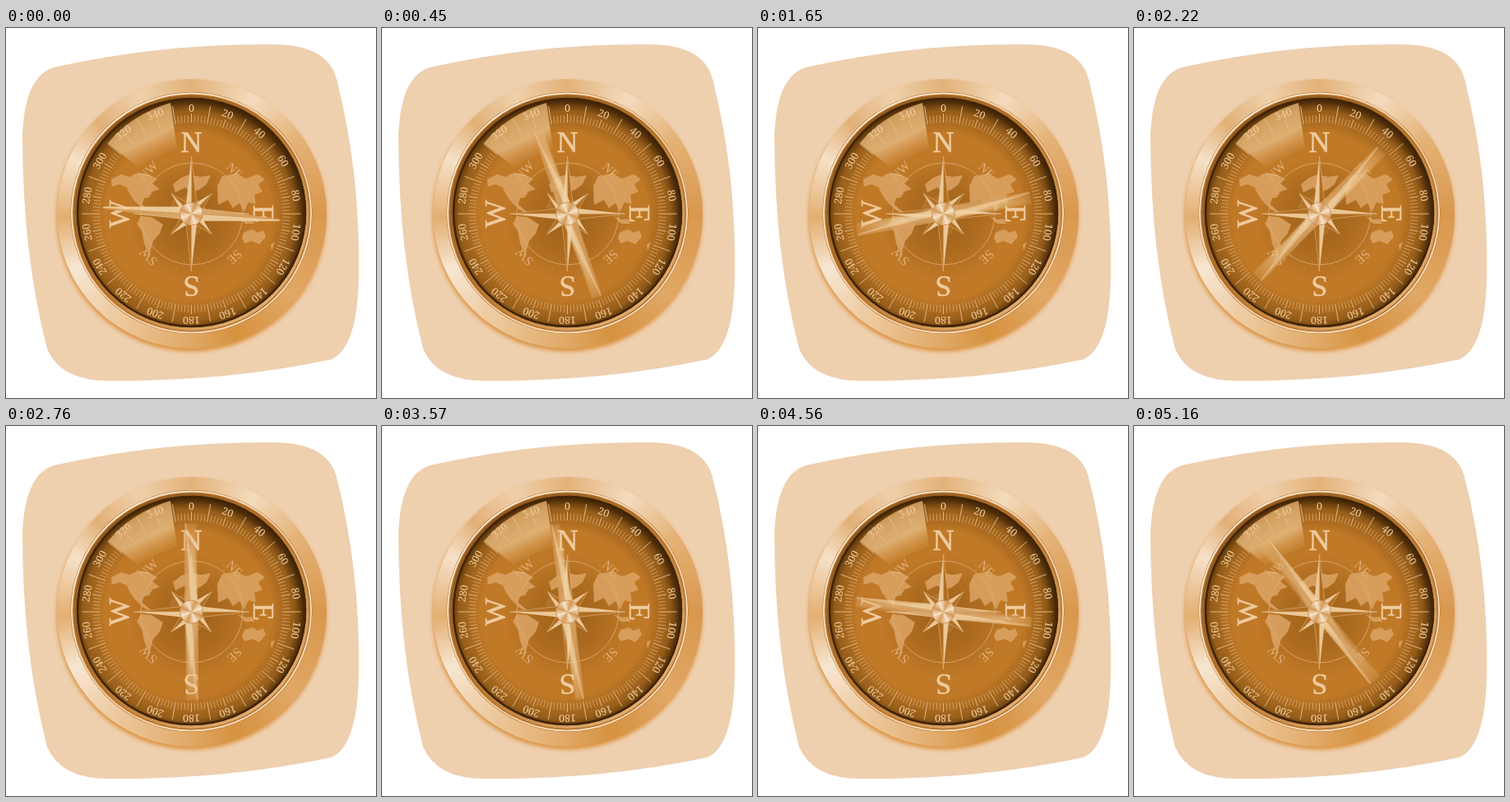
These frames come from a looping animation (450 px wide and 450 px high, 5190 ms). An HTML page with a canvas:

```html
<!DOCTYPE html>
<html lang="en">
<head>
<meta charset="utf-8">
<title>Compass</title>
<style>
  html, body { margin: 0; width: 100%; height: 100%; overflow: hidden; background: #fff; }
  svg, canvas { position: absolute; left: 0; top: 0; width: 450px; height: 450px; }
  text { fill: #eecb9e; text-anchor: middle; font-family: "Noto Serif", "Liberation Serif", serif; }
  .cardinal { font: 36px "Liberation Serif", serif; stroke: #eecb9e; stroke-width: .5; }
  .diagonal { font: 15.5px "Liberation Serif", serif; fill: #e0b078; }
  .degree { font-size: 12.5px; }
  .bezel {
    width: 328px; height: 328px; border-radius: 50%;
    background: conic-gradient(#e3b27a, #f3dbbd 28deg, #e4b277 55deg, #d9984e 90deg,
      #e0a765 130deg, #d6923f 160deg, #e4b277 190deg, #efcfa8 222deg, #f7e6d2 245deg,
      #e2af72 268deg, #f5e1c8 295deg, #e2b078 314deg, #efd0aa 336deg, #e3b27a);
  }
</style>
</head>
<body>
<svg viewBox="0 0 450 450">
  <defs>
    <linearGradient id="rim" x1=".1" y1=".1" x2=".9" y2=".9">
      <stop offset="0" stop-color="#fbeedd"/>
      <stop offset=".5" stop-color="#f1cfa6"/>
      <stop offset="1" stop-color="#f7dfc2"/>
    </linearGradient>
    <linearGradient id="wall" x1=".15" y1=".1" x2=".85" y2=".9">
      <stop offset="0" stop-color="#8a561a"/>
      <stop offset=".5" stop-color="#b9762c"/>
      <stop offset="1" stop-color="#e4b075"/>
    </linearGradient>
    <radialGradient id="face" gradientUnits="userSpaceOnUse" cx="225" cy="232" r="140">
      <stop offset="0" stop-color="#9b601b"/>
      <stop offset=".3" stop-color="#ad6b1f"/>
      <stop offset=".55" stop-color="#c07927"/>
      <stop offset="1" stop-color="#bf7826"/>
    </radialGradient>
    <radialGradient id="shade" gradientUnits="userSpaceOnUse" cx="222" cy="229" r="145">
      <stop offset=".7" stop-color="#5a3508" stop-opacity="0"/>
      <stop offset=".88" stop-color="#5a3508" stop-opacity=".4"/>
      <stop offset=".96" stop-color="#432605" stop-opacity=".9"/>
      <stop offset="1" stop-color="#382004"/>
    </radialGradient>
    <linearGradient id="glare" gradientUnits="userSpaceOnUse" x1="158" y1="108" x2="185" y2="164">
      <stop offset="0" stop-color="#e3ae6c" stop-opacity=".8"/>
      <stop offset=".5" stop-color="#ecc38c" stop-opacity=".75"/>
      <stop offset="1" stop-color="#d99b55" stop-opacity="0"/>
    </linearGradient>
    <filter id="soft" x="-20%" y="-20%" width="140%" height="140%"><feGaussianBlur stdDeviation="2.500"/></filter>
  </defs>

  <path fill="#eecfae" d="M62 47Q190 19 320 20Q390 18 402 62Q431 175 429 300Q428 388 396 403Q270 430 125 429Q66 429 50 390Q20 275 20 130Q23 55 62 47Z"/>

  <circle cx="225.500" cy="229.500" r="164" fill="#d98c34" opacity=".9" filter="url(#soft)"/>
  <foreignObject x="61.500" y="62" width="328" height="328"><div class="bezel"></div></foreignObject>
  <circle cx="225.500" cy="225" r="147" fill="#b4702a"/>
  <circle cx="225.500" cy="225" r="145.500" fill="none" stroke="url(#rim)" stroke-width="2"/>
  <circle cx="225.500" cy="225" r="143" fill="url(#wall)"/>
  <circle cx="225.500" cy="224.500" r="139.500" fill="url(#face)"/>
  <circle cx="225.500" cy="224.500" r="139.500" fill="url(#shade)"/>
  <circle cx="225.500" cy="224.500" r="138.500" fill="none" stroke="#402405" stroke-width="2.500"/>
  <path fill="url(#glare)" d="M124 140Q153 105 200 91L208 146Q188 153 160 169Z"/>

  <g fill="#dca465" opacity=".85">
    <path d="M128 184L140 178L150 181L160 176L174 178L184 184L178 189L187 196L178 199L174 206L167 207L165 214L173 221L180 227L167 221L157 211L151 203L147 194L138 190L129 193Z"/>
    <path d="M164 229L177 230L191 239L187 250L179 259L174 277L168 262L165 247L159 238Z"/>
    <path d="M203 190L213 182L224 178L236 181L249 179L244 190L236 196L226 200L218 194L206 200Z"/>
    <path d="M203 209L218 204L236 210L245 222L241 238L234 252L226 251L222 235L207 226L199 218Z" opacity=".25"/>
    <path d="M257 192L263 180L280 177L292 183L306 178L315 184L307 190L312 199L302 203L304 214L295 212L290 223L284 213L276 219L270 209L258 215Z"/>
    <path d="M290 248L300 245L306 249L313 246L316 254L308 263L299 259L290 262L287 255Z"/>
    <path d="M282 229L292 233L299 232L302 238L291 238ZM322 263L327 260L323 271Z"/>
  </g>

  <circle cx="226" cy="226" r="62" fill="none" stroke="#deb07a" stroke-width=".8"/>
  <path id="minor" stroke="#dcaa6c" stroke-width=".8"/>
  <path id="major" stroke="#e8c08d" stroke-width=".9"/>
  <g id="labels"></g>
  <g id="rose"></g>
</svg>
<canvas width="450" height="450"></canvas>

<script>
const LOOP = 5190, STEP = 30, CX = 225.5, CY = 226;
const NS = "http://www.w3.org/2000/svg";
const byId = id => document.getElementById(id);

function polar(deg, r) {
  const a = deg * Math.PI / 180;
  return [CX + r * Math.sin(a), CY - r * Math.cos(a)];
}

function add(parent, tag, attrs, content = "") {
  const el = document.createElementNS(NS, tag);
  for (const key in attrs) el.setAttribute(key, attrs[key]);
  el.textContent = content;
  byId(parent).append(el);
}

function label(content, deg, r, cls, drop) {
  const [x, y] = polar(deg, r);
  add("labels", "text", {
    class: cls, y: drop, transform: `translate(${x} ${y}) rotate(${deg})`
  }, content);
}

// Dial scale
const ticks = { minor: "", major: "" };
for (let d = 0; d < 360; d += 2) {
  const long = d % 20 === 10, mid = d % 10 === 0;
  const from = polar(d, 111), to = polar(d, long ? 133 : mid ? 122 : 120);
  ticks[mid ? "major" : "minor"] += `M${from}L${to}`;
}
byId("minor").setAttribute("d", ticks.minor);
byId("major").setAttribute("d", ticks.major);
for (let d = 0; d < 360; d += 20) label(d, d, 129, "degree", 4.5);
["N", "E", "S", "W"].forEach((c, i) => label(c, i * 90, 87.5, "cardinal", 12));
["NE", "SE", "SW", "NW"].forEach((c, i) => label(c, 45 + i * 90, 74, "diagonal", 5));

// Eight-pointed rose: each point has a light and a dark half
function rosePoint(deg, length, waist) {
  const tip = polar(deg, length), c = [CX, CY];
  add("rose", "polygon", { points: [c, polar(deg - 45, waist), tip].join(" "), fill: "#ebc797" });
  add("rose", "polygon", {
    points: [c, polar(deg + 45, waist), tip].join(" "),
    fill: "#b06e22", stroke: "#e2b580", "stroke-width": 0.6
  });
}
for (let d = 45; d < 360; d += 90) rosePoint(d, 35, 10);
for (let d = 0; d < 360; d += 90) rosePoint(d, 70, 10);

// Needle heading: [ms, degrees]
const heading = [
  [0, -86], [570, 0], [870, 59.6], [1650, 256], [2760, 536], [3300, 658], [3570, 709.5],
  [3870, 755], [4410, 670], [4560, 639], [4950, 565], [5160, 504.5], [5190, 496]
];

function slope(i) {
  if (i === 0) return 0;
  const a = heading[i - 1], b = heading[Math.min(i + 1, heading.length - 1)];
  return (b[1] - a[1]) / (b[0] - a[0]);
}

function angleAt(t) {
  let i = 0;
  while (i < heading.length - 2 && t >= heading[i + 1][0]) i++;
  const [t0, p0] = heading[i], [t1, p1] = heading[i + 1];
  const h = t1 - t0, u = (t - t0) / h, v = 1 - u;
  return v * v * (1 + 2 * u) * p0 + u * u * (3 - 2 * u) * p1
    + h * u * v * (v * slope(i) - u * slope(i + 1));
}

const ctx = document.querySelector("canvas").getContext("2d");

function facet(side, end, color) {
  ctx.fillStyle = color;
  ctx.beginPath();
  ctx.moveTo(0, 0);
  ctx.lineTo(side * 8.5, 0);
  ctx.lineTo(side * 1.2, end * 106);
  ctx.lineTo(0, end * 109);
  ctx.fill();
}

function needle(deg, alpha) {
  ctx.save();
  ctx.globalAlpha = alpha;
  ctx.translate(CX, CY);
  ctx.rotate(deg * Math.PI / 180);
  for (const end of [-1, 1]) {
    facet(end, end, "#d6a263");
    facet(-end, end, "#f0d0a4");
  }
  ctx.restore();
}

function hub() {
  const metal = ctx.createConicGradient(0.4, CX, CY);
  for (let i = 0; i <= 8; i++) metal.addColorStop(i / 8, i % 2 ? "#f7e3ca" : "#d39a58");
  ctx.fillStyle = metal;
  ctx.strokeStyle = "#c48a4b";
  ctx.lineWidth = 0.8;
  ctx.beginPath();
  ctx.arc(CX, CY, 14, 0, 7);
  ctx.fill();
  ctx.stroke();
}

// Motion blur: faint copies ahead of a firmer trailing one
function draw(t) {
  const now = angleAt(t), copies = 8;
  const smear = 0.7 * (angleAt(Math.min(t + 20, LOOP)) - angleAt(Math.max(t - 20, 0)));
  ctx.clearRect(0, 0, 450, 450);
  for (let i = copies; i > 0; i--) needle(now + smear * i / copies, 0.16);
  needle(now, 0.6);
  hub();
}

const start = performance.now();
function tick() {
  const t = (performance.now() - start) % LOOP;
  draw(Math.floor(t / STEP) * STEP);
  requestAnimationFrame(tick);
}
tick();
</script>
</body>
</html>
```
